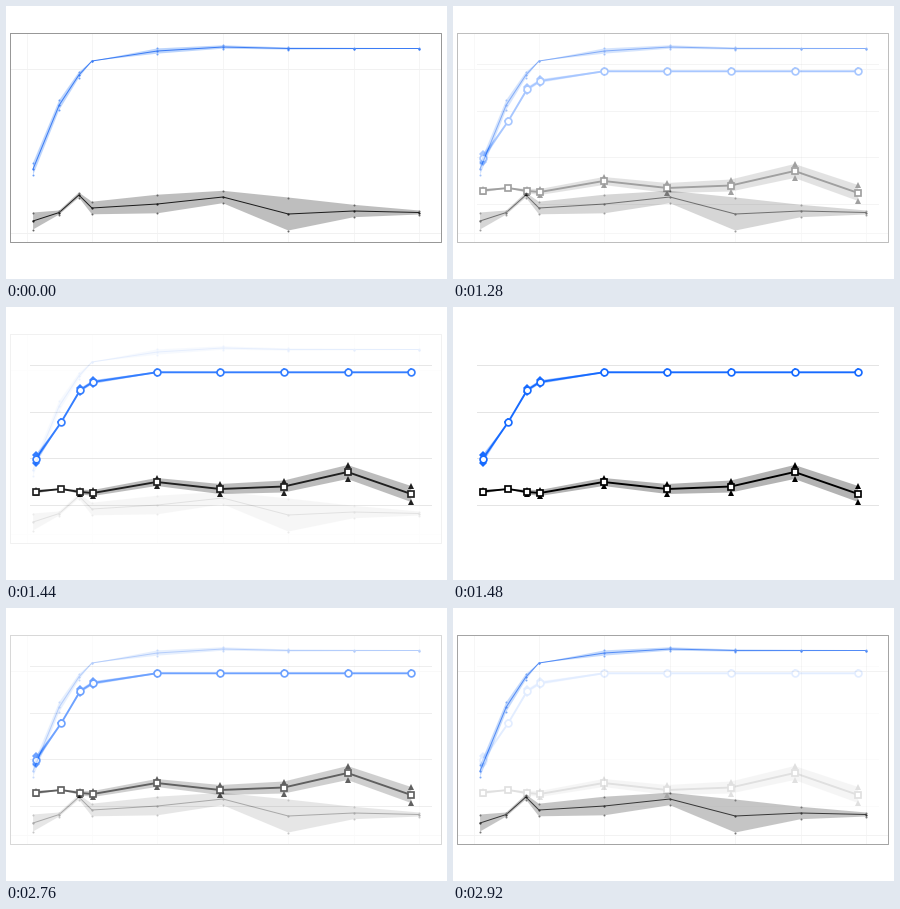
Recreate the animation shown at these times as a matplotlib script. Size 441 px wide and 273 px high, loop 2.96 s.

```python
import numpy as np
import matplotlib.pyplot as plt
from matplotlib.animation import FuncAnimation

W, H, DPI = 441, 273, 64
PX = 72 / DPI          # points per pixel
STEP, FRAMES = 40, 74  # 2960 ms per loop
FADE_IN, FADE_OUT, FADE = 29, 66, 8

U = np.array([.1, .5, .8, 1, 2, 3, 4, 5, 6])  # shared sample positions
PULSE = abs(np.cos(np.pi * U))                # spread vanishes at U = .5

fig = plt.figure(figsize=(W / DPI, H / DPI), dpi=DPI, facecolor="white")


def stage():
    """Full-figure axes in pixel coordinates, y pointing down."""
    ax = fig.add_axes([0, 0, 1, 1], facecolor="white")
    ax.set(xlim=(0, W), ylim=(H, 0), xticks=[], yticks=[])
    ax.spines[:].set_visible(False)
    return ax


def line(ax, x, y, color, width, z=2):
    ax.plot(x, y, color=color, lw=width * PX, zorder=z)


def dots(ax, x, y, marker, size, color, z=3, face=None, edge=0):
    ax.plot(x, y, ls="none", marker=marker, ms=size * PX, mec=color,
            mfc=face or color, mew=edge * PX, zorder=z)


def series(ax, x, mid, spread, ink, fill, width, tip, tip_size, tip_ink):
    """Line inside a band, with a small mark on each band corner."""
    top, low = mid - spread, mid + spread
    ax.fill(np.r_[x, x[::-1]], np.r_[top, low[::-1]], color=fill, lw=0,
            zorder=1)
    line(ax, x, mid, ink, width)
    for edge in (top, low):
        dots(ax, x, edge, tip, tip_size, tip_ink)


def level_off(*keys):
    """Key heights at the first samples; the last one is held."""
    return np.interp(U, U[:len(keys)], keys)


def framed_chart():
    ax = stage()
    x = 20.5 + 65.45 * U
    for gx in 20.5 + 65.45 * np.arange(7):
        line(ax, [gx, gx], [28, 236], "#f5f5f5", 1, 0)
    for y in (63, 227):
        line(ax, [5, 435], [y, y], "#f1f1f1", 1, 0)
    line(ax, [4, 435, 435, 4, 4], [27, 27, 236, 236, 27], "#989898", 1, 5)

    gray = np.array([215, 206.5, 189, 202, 198, 191, 208, 205, 206.5])
    gray_spread = np.array([8.5, 2, 2.5, 6.3, 9.3, 6.2, 16.5, 6.2, 2])
    blue = level_off(163, 99, 69, 55, 45, 41, 42.5)
    blue_spread = 6.5 * np.exp(-U / 2.2) * np.tanh(4 * abs(1 - U))
    for mid, spread, ink, fill, tip in (
            (gray, gray_spread, "#1c1c1c", "#bebebe", "#666666"),
            (blue, blue_spread, "#3b7cf5", "#bdd5fc", "#6b9ff8")):
        series(ax, x, mid, spread, ink, fill, 1, "o", 2, tip)
        dots(ax, x, mid, "o", 2.2, ink, 4)
    return ax


def open_chart():
    ax = stage()
    x = 23.3 + 63.65 * U
    for y in (58, 105, 151, 198):
        line(ax, [24, 425], [y, y], "#e4e4e4", 1, 0)

    black = np.array([184.5, 182, 185, 186, 175, 182, 179.5, 165, 187])
    blue = level_off(152, 115.3, 83, 75, 65.3)
    for mid, spread, ink, fill, tip, tip_size, mark, size in (
            (black, (2 + U) * PULSE, "#000000", "#b3b3b3", "^", 6.8, "s", 6.4),
            (blue, 5 * np.exp(-U) * PULSE, "#176bff", "#a3c4ff",
             "D", 5, "o", 6.8)):
        series(ax, x, mid, spread, ink, fill, 1.9, tip, tip_size, ink)
        dots(ax, x, mid, mark, size, ink, 4, "white", 1.7)
    return ax


def mix(i):
    """Share of the open chart at step i."""
    return float(np.clip(min(i - FADE_IN, FADE_OUT + FADE - i) / FADE, 0, 1))


def fade(k):
    def apply(img, dpi):
        out = img.copy()
        out[..., 3] *= k
        return out, 0, 0
    return apply


framed = framed_chart()
opened = open_chart()


def update(i):
    k = mix(i)
    opened.set_visible(k > 0)
    opened.set_agg_filter(fade(k) if k < 1 else None)
    return []


anim = FuncAnimation(fig, update, frames=FRAMES, interval=STEP,
                     init_func=lambda: update(0), repeat=True, repeat_delay=0)
plt.show()
```
